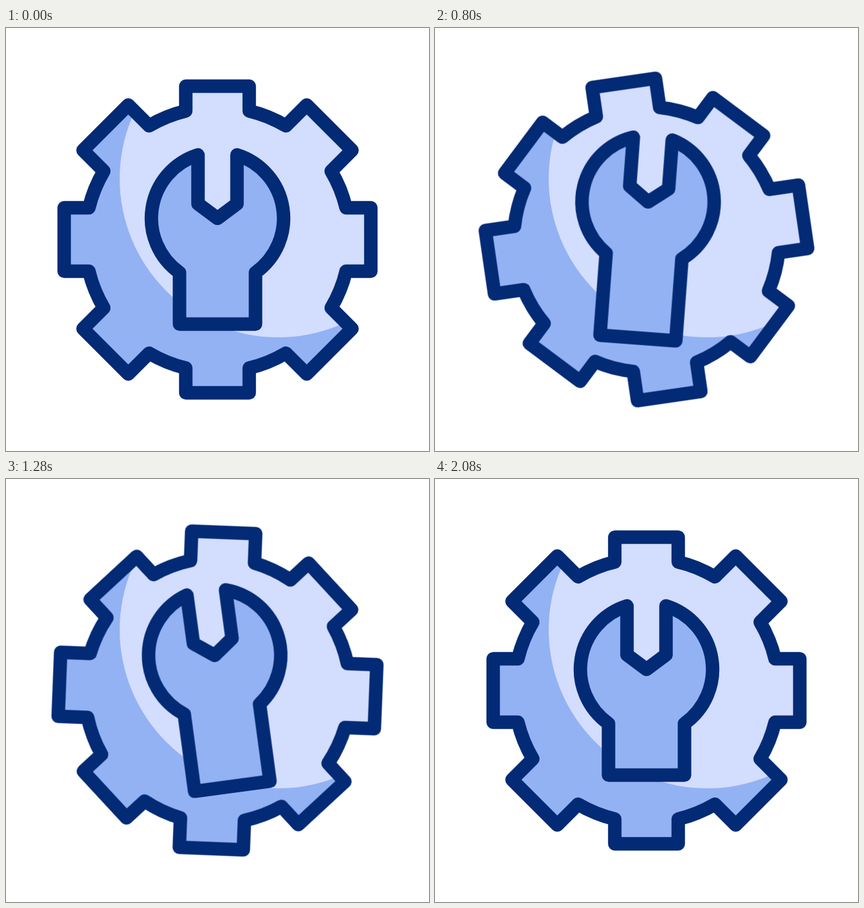
Animation, 640 px wide and 640 px high, one loop 2160 ms. Source, as an HTML page:

```html
<!DOCTYPE html>
<html lang="en">
<head>
<meta charset="utf-8">
<title>Gear and wrench</title>
<style>
  html, body { margin: 0; width: 100%; height: 100%; overflow: hidden; background: #fff; }
  svg { display: block; width: 100%; height: 100%; }

  .line { fill: none; stroke: #032a75; stroke-width: 20.4; stroke-linecap: round; stroke-linejoin: round; }
  .mid { fill: #93b2f4; }
  .light { fill: #d3ddfd; }

  .spin, .lift, .tilt, .stretch {
    animation: 2160ms cubic-bezier(.65, 0, .35, 1) infinite paused;
    transform-origin: 320px 320px;
  }
  .spin { animation-name: spin; }
  .lift { animation-name: lift; }
  .tilt { animation-name: tilt; }
  .stretch { animation-name: stretch; }

  @keyframes spin {
    0%, 1.852% { transform: rotate(0deg); }
    96.296%, 100% { transform: rotate(180deg); }
  }
  @keyframes lift {
    0%, 1.852%, 90.046%, 100% { transform: translateY(0); }
    43.287% { transform: translateY(-25.5px); }
  }
  @keyframes tilt {
    0%, 1.852% { transform: rotate(0deg); }
    29.444% { transform: rotate(5.1deg); }
    61.019% { transform: rotate(-7.7deg); }
    90.833%, 100% { transform: rotate(0deg); }
  }
  /* Only the handle gets longer. */
  @keyframes stretch {
    0%, 1.852%, 90.046%, 100% {
      d: path("M290.5 192V266L320 288L349.5 266V192A100.5 100.5 0 0 1 377.5 370V448H262.5V370A100.5 100.5 0 0 1 290.5 192Z");
    }
    43.287% {
      d: path("M290.5 192V266L320 288L349.5 266V192A100.5 100.5 0 0 1 377.5 370V495.5H262.5V370A100.5 100.5 0 0 1 290.5 192Z");
    }
  }
</style>
</head>
<body>
<svg viewBox="0 0 640 640">
  <defs>
    <path id="gear" d="M272 88H368V125.5A200 200 0 0 1 423.5 148L455 116.5 523.5 185 492 216.5
      A200 200 0 0 1 514.5 272H552V368H514.5A200 200 0 0 1 492 423.5L523.5 455 455 523.5 423.5 492
      A200 200 0 0 1 368 514.5V552H272V514.5A200 200 0 0 1 216.5 492L185 523.5 116.5 455 148 423.5
      A200 200 0 0 1 125.5 368H88V272H125.5A200 200 0 0 1 148 216.5L116.5 185 185 116.5 216.5 148
      A200 200 0 0 1 272 125.5Z"/>
    <clipPath id="inside"><use href="#gear" class="spin"/></clipPath>
  </defs>

  <use href="#gear" class="mid spin"/>
  <g clip-path="url(#inside)"><circle class="light" cx="412" cy="228" r="240"/></g>
  <use href="#gear" class="line spin"/>

  <g class="lift">
    <g class="tilt">
      <path class="line stretch" style="fill:#93b2f4" d="M290.5 192V266L320 288L349.5 266V192A100.5 100.5 0 0 1 377.5 370V448H262.5V370A100.5 100.5 0 0 1 290.5 192Z"/>
    </g>
  </g>
</svg>
<script>
  // Advance the paused keyframes in 40 ms steps.
  const LOOP = 2160, STEP = 40;
  const anims = document.getAnimations();

  function tick() {
    const t = Math.floor(performance.now() / STEP) * STEP % LOOP;
    for (const a of anims) a.currentTime = t;
    requestAnimationFrame(tick);
  }
  tick();
</script>
</body>
</html>
```
